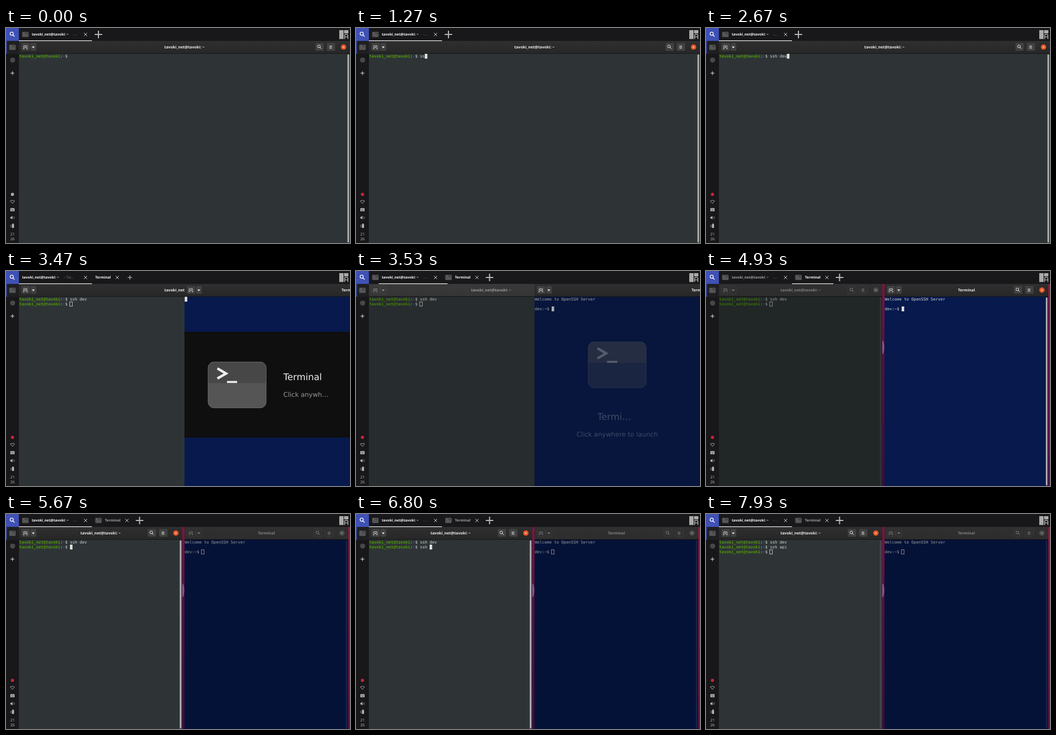
These frames come from a looping animation (640x400 px, 8000 ms). An HTML page with a canvas:

```html
<!DOCTYPE html>
<html lang="en">
<head>
<meta charset="utf-8">
<title>Tiling terminals</title>
<style>
html, body { margin: 0; width: 100%; height: 100%; overflow: hidden; background: #18171a; }
canvas { display: block; width: 640px; height: 400px; }
</style>
</head>
<body>
<canvas id="stage" width="640" height="400"></canvas>
<script>
const ctx = document.getElementById('stage').getContext('2d');
const LOOP = 8000, CELL = 4.5, ROW = 9;
const USER = 'tavoki_net@tavoki', TITLE = USER + ': ~';
const SANS = '"Noto Sans", sans-serif', MONO = '"DejaVu Sans Mono", monospace';
const FIRST_KEYS = [1000, 1170, 1450, 1730, 2200, 2400, 2670];
const SECOND_KEYS = [6000, 6150, 6370, 6570, 6830, 7020, 7230];
const ENTER_1 = 3000, OPEN = 3250, SPLIT = 3488, REFOCUS = 5300, ENTER_2 = 7530, UNFOCUS = 7780;

const progress = (t, start, length) => Math.min(1, Math.max(0, (t - start) / length));
const easeOut = p => 1 - (1 - p) ** 3;
const easeInOut = p => p < .5 ? 2 * p * p : 1 - 2 * (1 - p) ** 2;
const mix = (a, b, p) => a + (b - a) * p;
const typed = (text, keys, t) => text.slice(0, keys.filter(k => k <= t).length);

function box(x, y, w, h, color) {
  ctx.fillStyle = color;
  ctx.fillRect(x, y, w, h);
}

function rounded(x, y, w, h, r, fill, stroke) {
  ctx.beginPath();
  ctx.roundRect(x, y, w, h, r);
  ctx.fillStyle = fill;
  ctx.fill();
  if (stroke) { ctx.strokeStyle = stroke; ctx.lineWidth = 1; ctx.stroke(); }
}

function disc(x, y, r, color) {
  ctx.beginPath();
  ctx.arc(x, y, r, 0, 7);
  ctx.fillStyle = color;
  ctx.fill();
}

function line(color, width, ...points) {
  ctx.beginPath();
  for (let i = 0; i < points.length; i += 2) ctx.lineTo(points[i], points[i + 1]);
  ctx.strokeStyle = color;
  ctx.lineWidth = width;
  ctx.stroke();
}

function label(text, x, y, font, color, align = 'left') {
  ctx.font = font;
  ctx.textAlign = align;
  ctx.fillStyle = color;
  ctx.fillText(text, x, y);
}

function cross(x, y, r, color, width = 1) {
  line(color, width, x - r, y - r, x + r, y + r);
  line(color, width, x - r, y + r, x + r, y - r);
}

function plus(x, y, r, color, width) {
  line(color, width, x - r, y, x + r, y);
  line(color, width, x, y - r, x, y + r);
}

function magnifier(x, y, r, color, width) {
  ctx.beginPath();
  ctx.arc(x - r * .3, y - r * .3, r, 0, 7);
  ctx.strokeStyle = color;
  ctx.lineWidth = width;
  ctx.stroke();
  line(color, width, x + r * .4, y + r * .4, x + r * 1.5, y + r * 1.5);
}

function terminalIcon(cx, cy, w) {
  const h = w * .79, x = cx - w / 2, y = cy - h / 2, large = w > 50;
  const ink = large ? '#eee' : '#b4b4b4';
  rounded(x, y, w, h, w * .1, '#555');
  rounded(x, y, w, h * .46, [w * .1, w * .1, 0, 0], '#474747');
  ctx.beginPath();
  ctx.roundRect(x, y, w, h, w * .1);
  ctx.strokeStyle = '#6c6c6c';
  ctx.lineWidth = large ? 1 : .4;
  ctx.stroke();
  line(ink, w * .042, x + w * .16, y + h * .14, x + w * .31, y + h * .25, x + w * .16, y + h * .36);
  line(ink, w * .034, x + w * .325, y + h * .435, x + w * .5, y + h * .435);
}

// Monospaced text on the terminal's cell grid.
function cells(text, x, row, color, bold) {
  [...text].forEach((c, i) =>
    label(c, x + i * CELL, 55 + row * ROW, (bold ? 'bold ' : '') + '7.5px ' + MONO, color));
}

function cursor(x, col, row, solid) {
  const left = x + col * CELL, top = 48 + row * ROW;
  if (solid) box(left, top, CELL + .2, ROW, '#dfe3df');
  else {
    ctx.strokeStyle = '#b9bdb6';
    ctx.lineWidth = 1;
    ctx.strokeRect(Math.round(left) - .5, top + .5, 5, ROW - 1);
  }
}

function promptLine(x, row, command) {
  cells(USER, x, row, '#4e9a06', true);
  cells(':', x + 17 * CELL, row, '#d3d7cf');
  cells('~', x + 18 * CELL, row, '#3465a4', true);
  cells('$ ' + command, x + 19 * CELL, row, '#d3d7cf');
}

function header(x, w, title, active) {
  const right = x + w, ink = active ? '#eee' : '#b4b4b4';
  const button = (bx, bw) =>
    rounded(bx + .5, 27.5, bw, 15, 2, active ? '#414141' : '#434343', active ? '#303030' : '#4d4d4d');
  const shade = ctx.createLinearGradient(0, 24, 0, 47);
  shade.addColorStop(0, active ? '#2f2f2f' : '#424242');
  shade.addColorStop(1, active ? '#272727' : '#3e3e3e');
  box(x, 24, w, 24, shade);
  box(x, 47, w, 1, '#161616');
  button(x + 4, 16);
  button(x + 21, 11);
  line(ink, .8, x + 9, 39, x + 9, 33, x + 15, 33, x + 15, 39);
  line(ink, .8, x + 8, 38.6, x + 10, 38.6);
  line(ink, .8, x + 14, 38.6, x + 16, 38.6);
  plus(x + 12, 36, 1.5, ink, .8);
  ctx.beginPath();
  ctx.moveTo(x + 24, 34.5);
  ctx.lineTo(x + 29.5, 34.5);
  ctx.lineTo(x + 26.8, 37.5);
  ctx.fillStyle = ink;
  ctx.fill();
  label(title, x + w / 2, 38, 'bold 7.2px ' + SANS, ink, 'center');
  button(right - 65, 16);
  button(right - 44, 16);
  magnifier(right - 57, 35, 2.5, ink, 1);
  for (const y of [33, 35.2, 37.4]) box(right - 38.5, y, 5, .9, ink);
  disc(right - 12, 35.5, 5, active ? '#e95420' : '#666');
  cross(right - 12, 35.5, 1.7, active ? '#fff' : '#ddd', .9);
}

function windowFrame(win, content) {
  const { x, w, title, active, focused, background, dim } = win;
  ctx.save();
  ctx.beginPath();
  ctx.rect(x, 24, w, 376);
  ctx.clip();
  box(x, 24, w, 376, background);
  content(x + .5);
  rounded(x + w - 4.7, 49, 3, 350, 1.5, focused ? '#b2b4b3' : 'rgba(190,190,190,.14)');
  header(x, w, title, active);
  box(x, 24, w, 376, `rgba(0,0,0,${.28 * dim})`);
  ctx.restore();
}

function splash(x, t) {
  ctx.globalAlpha = progress(-t, -3548, 70);
  if (t < 3500) {
    box(x, 113, 308, 197, '#0f0f0f');
    terminalIcon(x + 98, 212, 108);
    label('Terminal', x + 184, 203, '17px "DejaVu Sans", sans-serif', '#eee');
    label('Click anywh…', x + 184, 234, '12px "DejaVu Sans", sans-serif', '#999');
  } else {
    box(x, 48, 308, 352, '#0f0f0f');
    terminalIcon(x + 154, 174.5, 108);
    label('Termi…', x + 148.5, 277, '17px "DejaVu Sans", sans-serif', '#eee', 'center');
    label('Click anywhere to launch', x + 154, 308, '12px "DejaVu Sans", sans-serif', '#eee', 'center');
  }
  ctx.globalAlpha = 1;
}

function leftWindow(t, split, swap) {
  const away = t >= SPLIT && t < REFOCUS;
  const focused = t < OPEN || (t >= REFOCUS && t < UNFOCUS);
  windowFrame({
    x: 24, w: mix(616, 304, split), title: TITLE, active: !away, focused,
    background: '#2e3436', dim: split - swap
  }, x => {
    const commands = [typed('ssh dev', FIRST_KEYS, t)];
    if (t >= ENTER_1) commands.push(typed('ssh api', SECOND_KEYS, t));
    if (t >= ENTER_2) commands.push('');
    commands.forEach((command, row) => promptLine(x, row, command));
    const row = commands.length - 1;
    if (t >= 300) cursor(x, 21 + commands[row].length, row, focused);
  });
}

function rightWindow(t, swap) {
  const x = mix(640, 332, easeOut(progress(t, OPEN, 200)));
  const active = t < REFOCUS;
  windowFrame({
    x, w: mix(616, 305, easeOut(progress(t, 3540, 200))), title: 'Terminal', active,
    focused: active, background: '#07194d', dim: swap
  }, left => {
    if (t < 3500) cursor(left, 0, 0, true);
    else {
      cells('Welcome to OpenSSH Server', left, 0, '#d3d7cf');
      cells('dev:~$', left, 2, '#d3d7cf');
      cursor(left, 7, 2, active);
    }
    if (t < 3548) splash(x, t);
  });
}

function wallpaper() {
  const shade = ctx.createLinearGradient(640, 24, 280, 400);
  shade.addColorStop(0, '#a01238');
  shade.addColorStop(.4, '#8a1040');
  shade.addColorStop(.6, '#5c0c44');
  shade.addColorStop(1, '#3a0a38');
  box(24, 24, 616, 376, shade);
  ctx.beginPath();
  ctx.ellipse(328, 142, 3.6, 13, 0, 0, 7);
  ctx.fillStyle = '#95508a';
  ctx.fill();
}

function tabBar(t) {
  const font = 'bold 6.6px ' + SANS, grey = '#777';
  const firstActive = t < 3600 || t >= REFOCUS;
  const secondActive = t >= OPEN && t < REFOCUS;
  const opening = t >= OPEN && t < 3500;
  const ink = on => on ? '#fff' : '#a5a5a5';
  box(24, 0, 616, 24, '#18171a');
  if (!opening) terminalIcon(36, 12, 11.5);
  label(TITLE, opening ? 30 : 48, 14.3, font, ink(firstActive));
  label(opening ? '– Ter…' : '-…', opening ? 107 : 125, 14.3, '6.6px ' + SANS, grey);
  cross(148, 12, 3, '#ccc');
  if (t >= OPEN) {
    if (!opening) terminalIcon(172, 12, 11.5);
    label('Terminal', opening ? 166 : 184, 14.3, font, ink(secondActive));
    cross(opening ? 207 : 225, 12, 3, '#ccc');
  }
  if (opening) plus(230.5, 12, 4, '#bbb', 1.2);
  else plus(t < OPEN ? 172 : 248.5, 12, 7, '#bbb', 2);

  const shift = easeInOut(progress(t, 3470, 235)) - easeInOut(progress(t, REFOCUS, 235));
  box(mix(24, 160, shift), 23, mix(136, 77, shift), 1.2, '#f2f2f2');

  box(620, 4, 8, 16.5, '#aaa');
  box(629, 4, 8, 6, '#aaa');
  line('#aaa', 1.6, 630, 20.5, 630, 13, 631.5, 11.8, 634.5, 11.8, 636, 13, 636, 20.5);
  line('#aaa', 1.4, 630, 16.5, 636, 16.5);
}

function sidebar(t) {
  const ink = '#b0b0b0';
  box(0, 0, 24, 400, '#18171a');
  box(0, 0, 24, 24, '#3f51b5');
  magnifier(11.5, 11.5, 3, '#fff', 1.3);
  box(0, 24, 24, 24, '#1f1e21');
  box(0, 24, 1.5, 24, '#3f51b5');
  terminalIcon(12, 36, 11.5);
  disc(12.3, 59.7, 4.8, '#48484a');
  plus(12, 84, 3.5, '#ddd', 1.1);

  disc(12, 309.5, 3, t < 400 ? '#aaa' : '#c92436');

  ctx.beginPath();
  ctx.moveTo(12, 326.5);
  ctx.lineTo(8, 321.8);
  ctx.quadraticCurveTo(12, 319, 16, 321.8);
  ctx.closePath();
  ctx.strokeStyle = ink;
  ctx.lineWidth = .9;
  ctx.stroke();

  rounded(8, 335, 8, 6, 1, ink);
  for (const x of [9.5, 11.5, 13.5]) box(x, 336.5, 1, 1, '#333');
  box(10, 338.7, 4, .8, '#333');

  ctx.beginPath();
  [[8, 351.5], [9.5, 351.5], [12, 349.5], [12, 356], [9.5, 354.2], [8, 354.2]]
    .forEach(p => ctx.lineTo(...p));
  ctx.fillStyle = ink;
  ctx.fill();
  line(ink, .7, 13.5, 351, 14.3, 352.8, 13.5, 354.6);
  line('#777', .7, 15, 350, 16, 352.8, 15, 355.6);

  line(ink, .8, 9, 366, 9, 371);
  rounded(11, 364.5, 4, 7.5, .7, ink);
  box(12.2, 363.5, 1.6, 1, ink);
  label('21', 12, 386.3, '7.2px ' + SANS, ink, 'center');
  label('26', 12, 395, '7.2px ' + SANS, ink, 'center');
}

function draw(t) {
  const split = easeOut(progress(t, SPLIT, 200));
  const swap = easeOut(progress(t, REFOCUS, 200));
  ctx.textRendering = 'geometricPrecision';
  wallpaper();
  leftWindow(t, split, swap);
  if (t >= OPEN) rightWindow(t, swap);
  tabBar(t);
  sidebar(t);
}

const start = performance.now();
function tick() {
  draw((performance.now() - start) % LOOP);
  requestAnimationFrame(tick);
}
tick();
</script>
</body>
</html>
```
